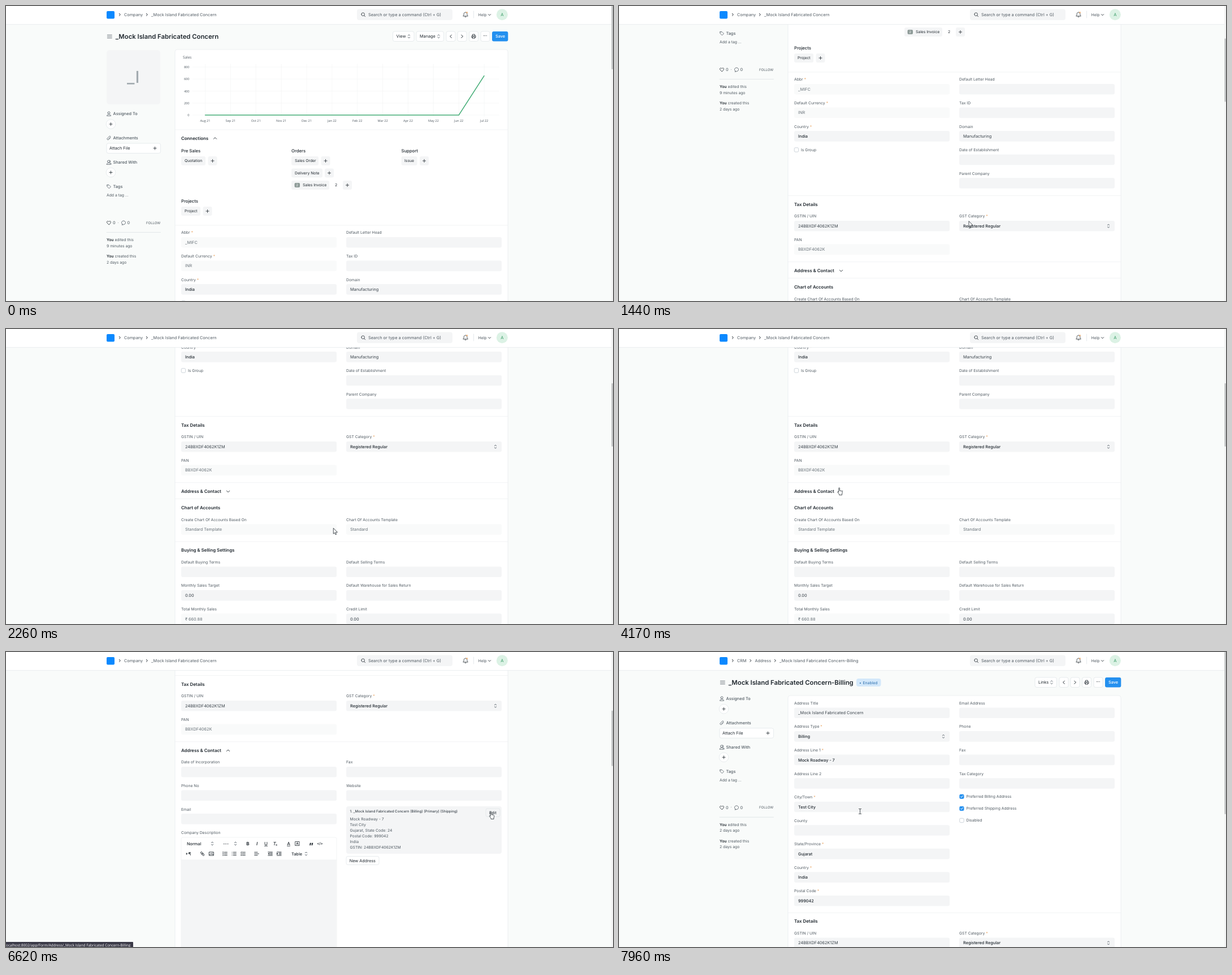
Animation of 1074 by 522 pixels, one loop 8000 ms. Source, as an HTML page:

```html
<!DOCTYPE html>
<html lang="en">
<head>
<meta charset="utf-8">
<title>Company form</title>
<style>
html, body { margin: 0; width: 100%; height: 100%; overflow: hidden; background: #f9fbfa; }
svg { display: block; width: 1074px; height: 522px; font-family: Inter, sans-serif; text-rendering: geometricPrecision; }
text { white-space: pre; }
.plain { font-family: "Open Sans", "Noto Sans", sans-serif; }
</style>
</head>
<body>
<svg id="stage" viewBox="0 0 1074 522"></svg>
<script>
const INK = '#1f272e', MID = '#505a62', MUTED = '#687178', FIELD = '#f4f5f6', LINE = '#eceff1', BLUE = '#2490ef';
const NAME = '_Mock Island Fabricated Concern', TAX_ID = '24BBXDF4062K1ZM', PAN = 'BBXDF4062K';
const LEFT = 310, RIGHT = 602, LOOP = 8000;

// Drawing helpers; text is placed by its vertical centre.
const text = (x, y, s, size = 6.8, fill = MID, weight = 400, extra = '') =>
  `<text x="${x}" y="${y + size * 0.36}" font-size="${size}" fill="${fill}" font-weight="${weight}" ${extra}>${s}</text>`;
const rect = (x, y, w, h, fill = FIELD, r = 3, extra = '') =>
  `<rect x="${x}" y="${y}" width="${w}" height="${h}" rx="${r}" fill="${fill}" ${extra}/>`;
const path = (d, stroke = MID, width = 0.8, fill = 'none') =>
  `<path d="${d}" stroke="${stroke}" stroke-width="${width}" fill="${fill}" stroke-linecap="round" stroke-linejoin="round"/>`;
const icon = (x, y, d, stroke, width, fill) => `<g transform="translate(${x} ${y})">${path(d, stroke, width, fill)}</g>`;
const group = (id, body) => `<g id="${id}">${body}</g>`;
const rule = (y, x = 299, end = 888) => path(`M${x} ${y}H${end}`, LINE, 0.7);
const raised = (x, y, w, h, fill = '#fff', extra = '') => rect(x, y, w, h, fill, 3, `stroke="#dfe4e7" stroke-width=".7" ${extra}`);

const right = (x, y, s = 1) => icon(x, y, `M${-s} ${-2 * s}L${s} 0L${-s} ${2 * s}`, INK, 1);
const left = (x, y, s = 1) => icon(x, y, `M${s} ${-2 * s}L${-s} 0L${s} ${2 * s}`, INK, 1);
const down = (x, y, s = 1) => icon(x, y, `M${-2.6 * s} ${-1.3 * s}L0 ${1.3 * s}L${2.6 * s} ${-1.3 * s}`, INK, 0.9);
const up = (x, y) => icon(x, y, 'M-2.6 1.3L0 -1.3L2.6 1.3', INK, 0.9);
const upDown = (x, y) => icon(x, y, 'M-1.7 -1.4L0 -3L1.7 -1.4M-1.7 1.4L0 3L1.7 1.4', MID, 0.9);
const plus = (x, y) => icon(x, y, 'M-2.6 0H2.6M0 -2.6V2.6', INK, 0.8);

const head = (y, s, x = LEFT) => text(x, y, s, 7.85, INK, 600);
const label = (x, y, s, req) => text(x, y, s + (req ? ' <tspan fill="#e9a25f">*</tspan>' : ''));

// kind: '' editable, 'r' read-only, 'b' emphasised, 's' select; a star marks required.
function field(x, y, name, value = '', kind = '') {
  const ro = kind.includes('r'), strong = /[bs]/.test(kind);
  return label(x, y, name, kind.includes('*')) + rect(x, y + 8, 275, 18.6, ro ? '#f9fafa' : FIELD) +
    text(x + 7, y + 17.3, value, 7.3, ro ? MUTED : strong ? INK : '#39424a', strong ? 500 : 400) +
    (kind.includes('s') ? upDown(x + 264, y + 17.3) : '');
}
const fields = (x, y, list) => list.map((f, i) => field(x, y + i * 41.55, ...f)).join('');

function check(y, name, on, x = RIGHT) {
  return rect(x + 0.7, y - 3.7, 7.4, 7.4, on ? BLUE : '#fff', 1.8, `stroke="${on ? BLUE : '#b8c2ca'}" stroke-width=".7"`) +
    (on ? icon(x + 4.4, y, 'M-1.9 0L-.5 1.5L2 -1.5', '#fff', 1) : '') + text(x + 12.5, y, name);
}

function badge(x, y, w, name, pad = 6) {
  return rect(x, y - 8, w, 16) + text(x + pad, y, name, 6.8, INK);
}
const adder = (x, y) => rect(x, y - 8, 16, 16) + plus(x + 8, y);

function sidebar(y, edited) {
  const round = cy => `<circle cx="185.5" cy="${cy}" r="8.3" fill="#fff" stroke="#dfe4e7" stroke-width=".7"/>` + plus(185.5, cy);
  const title = (cy, s) => text(189.5, cy, s, 7.3, MID, 500);
  const person = 'M-2 -1.5A2 2 0 1 1 2 -1.5A2 2 0 1 1 -2 -1.5M-3.5 3.5C-3 .3 3 .3 3.5 3.5Z';
  const you = (cy, s) => text(178, cy, `<tspan font-weight="600" fill="${INK}">You</tspan> ${s} this`);
  return `<g transform="translate(0 ${y})">` +
    icon(182, 190.5, person) + title(190.5, 'Assigned To') + round(209) +
    icon(182, 233.5, 'M2.8 -.5L-.3 2.8C-2 4.4 -4.2 2 -2.6 .4L.8 -3C2 -4 3.5 -2.5 2.4 -1.4L-.7 1.7') + title(233.5, 'Attachments') +
    raised(178, 243, 95.5, 17.5) + text(183, 251.7, 'Attach File', 7.3, INK) + plus(263.5, 251.7) +
    icon(181.5, 276.5, person) + icon(183.5, 276.5, 'M0 -3.5A2 2 0 0 1 0 .2M1 1Q2.8 1.5 2.8 3.5') + title(276.5, 'Shared With') + round(294.5) +
    icon(182, 319.5, 'M-3 -3H0L3.4 .4L.4 3.4L-3 0ZM-1.6 -1.5V-1.4') + title(319.5, 'Tags') + text(178, 334.8, 'Add a tag ...') +
    icon(182, 383.7, 'M0 3.2L-3 .2C-4.8 -2 -1.8 -4.5 0 -2C1.8 -4.5 4.8 -2 3 .2Z', INK) + text(189, 383.5, '0', 7.3) +
    text(197.5, 383, '·', 7.3) + icon(208, 383.5, 'M-2 2.7A3.5 3.3 0 1 1 .5 3.2L-2.7 3.7Z') + text(214.5, 383.5, '0', 7.3) +
    text(248, 383.5, 'FOLLOW', 6, MID) + path('M178 400.5H273.5', '#dde2e5', 0.8) +
    you(414, 'edited') + text(178, 424.2, edited) + you(443, 'created') + text(178, 453.2, '2 days ago') + '</g>';
}

function pageHead(title, menus) {
  const menu = ([x, w, s]) => raised(x, 45, w, 17.5) + text(x + 6, 53.7, s, 7.3, INK) + upDown(x + w - 9, 53.7);
  return icon(183.3, 54, 'M-4 -2.7H4M-4 0H4M-4 2.7H4', MID, 0.8) + text(193.7, 54, title, 11.3, INK, 600) +
    menus.map(menu).join('') + [779, 799, 819.5, 840].map(x => raised(x, 45, 16, 17.5)).join('') +
    left(787, 53.7, 1.3) + right(807, 53.7, 1.3) +
    icon(827.5, 53.7, 'M-2 -1V-3.5H2V-1M-2 2H-3.5V-1H3.5V2H2M-2 .8H2V3.5H-2Z', INK) +
    text(847.8, 52.3, '···', 7, INK, 700, 'text-anchor="middle"') +
    rect(860, 45, 28.3, 17.5, BLUE) + text(866, 53.7, 'Save', 7.3, '#fff', 500);
}
const card = h => rect(299, 77, 589, h, '#fff', 4, 'stroke="#e9edef" stroke-width=".8"');

function chart() {
  const months = ['Aug 21', 'Sep 21', 'Oct 21', 'Nov 21', 'Dec 21', 'Jan 22', 'Feb 22', 'Mar 22', 'Apr 22', 'May 22', 'Jun 22', 'Jul 22'];
  let out = text(313, 90.5, 'Sales', 6.4, MID, 400, 'class="plain"');
  for (let i = 0; i < 5; i++) {
    const y = 193 - i * 21.25;
    out += path(`M330 ${y}H872`, '#f1f3f4', 0.6) + text(324.5, y, i * 200, 5.6, MID, 400, 'class="plain" text-anchor="end"');
  }
  months.forEach((m, i) => {
    const x = 352.5 + i * 44.87;
    out += path(`M${x} 103V196`, '#f1f3f4', 0.6) + text(x, 202.5, m, 5.6, MID, 400, 'class="plain" text-anchor="middle"');
  });
  return out + path('M352.5 193H801.2L846 123.5', '#46ae78', 1.4);
}

function connections() {
  const sub = (x, y, s) => text(x, y, s, 7.7, INK, 500);
  return head(234, 'Connections') + up(370, 234) +
    sub(310, 256, 'Pre Sales') + badge(310, 274, 43, 'Quotation') + adder(357.5, 274) +
    sub(505, 256, 'Orders') + badge(505, 274, 48, 'Sales Order') + adder(557.5, 274) +
    badge(505, 295.5, 55, 'Delivery Note') + adder(564, 295.5) +
    badge(505, 317, 67, 'Sales Invoice', 20) + rect(510.5, 313, 9.5, 8, '#8e9b98', 2) +
    text(515.2, 317, '2', 6, '#fff', 400, 'text-anchor="middle"') + text(582, 317, '2', 6.8, INK) + adder(596, 317) +
    sub(699.5, 256, 'Support') + badge(699.5, 274, 28, 'Issue', 5.5) + adder(732, 274) +
    sub(310, 345, 'Projects') + badge(310, 363, 34, 'Project') + adder(348.5, 363);
}

const taxDetails = y => head(y, 'Tax Details') +
  fields(LEFT, y + 21, [['GSTIN / UIN', TAX_ID], ['PAN', PAN, 'r']]) + field(RIGHT, y + 21, 'GST Category', 'Registered Regular', 's*');

function settings() {
  return down(393, 739.5) + rule(752.5) + head(768, 'Chart of Accounts') +
    field(LEFT, 789.3, 'Create Chart Of Accounts Based On', 'Standard Template', 'r') +
    field(RIGHT, 789.3, 'Chart Of Accounts Template', 'Standard', 'r') +
    rule(828.3) + head(843, 'Buying &amp; Selling Settings') +
    fields(LEFT, 864.5, [['Default Buying Terms'], ['Monthly Sales Target', '0.00'], ['Total Monthly Sales', '₹ 660.88', 'r']]) +
    fields(RIGHT, 864.5, [['Default Selling Terms'], ['Default Warehouse for Sales Return'], ['Credit Limit', '0.00']]);
}

function editor() {
  const a = 904, b = 922;
  const glyph = (x, y, s, extra = '', weight = 500) => text(x, y, s, 8, INK, weight, 'text-anchor="middle" ' + extra);
  const rows = 'M-1.5 -2.7H3.8M-1.5 0H3.8M-1.5 2.7H3.8';
  const dent = 'M-3.8 -3H3.8M0 -1H3.8M0 1H3.8M-3.8 3H3.8';
  return rect(LEFT, 893, 275, 300, '#fff', 3, `stroke="${LINE}" stroke-width=".7"`) + rect(LEFT, 933, 275, 300, FIELD, 0) +
    rule(933, LEFT, 585) + text(320, a, 'Normal', 7.3, INK, 500) + upDown(365, a) + text(384, a, '---', 7.3, INK, 500) + upDown(406, a) +
    glyph(428, a, 'B', '', 700) + glyph(444, a, 'I', 'font-style="italic"', 600) + glyph(460, a, 'U', 'text-decoration="underline"') +
    glyph(475, a, 'T', 'font-style="italic"') + text(477, a + 2, 'x', 5.5, INK, 500) + glyph(500, a, 'A', 'text-decoration="underline"') +
    icon(515.5, a, 'M-3.5 -3.5H3.5V3.5H-3.5Z', INK, 0.8) + text(515.5, a, 'A', 6, INK, 600, 'text-anchor="middle"') +
    text(540, a + 3.5, '”', 14, INK, 800, 'text-anchor="middle"') + text(555.5, a, '&lt;/&gt;', 6, INK, 600, 'text-anchor="middle"') +
    icon(320, b, 'M-.6 -1.2L1 0L-.6 1.2Z', INK, 0.6, INK) + glyph(325, b, '¶') +
    icon(347.5, b, 'M-.5 .8C-2 -.2 -3.8 -1.2 -3 -2.7S-.5 -3 .8 -1.5M.5 -.8C2 .2 3.8 1.2 3 2.7S.5 3 -.8 1.5M-1 -1L1 1', INK, 1) +
    icon(363.5, b, 'M-3.8 -3H3.8V3H-3.8ZM-3 2L-1 -.5L.5 1L1.5 0L3 2M1.5 -1.5V-1.4', INK, 0.9) +
    [387.5, 403.5, 419.5].map((x, i) => icon(x, b, rows + ['M-3.5 -3.5V-2M-3.5 -.7V.7M-3.5 2V3.5', 'M-3.6 -2.7H-3.5M-3.6 0H-3.5M-3.6 2.7H-3.5',
      'M-4 -2.7L-3.4 -2L-2.6 -3.3M-4 0L-3.4 .7L-2.6 -.6M-4 2.7L-3.4 3.4L-2.6 2.1'][i], INK, 0.9)).join('') +
    icon(443.5, b, 'M-3.8 -2.7H1.5M-3.8 0H3.8M-3.8 2.7H1.5', INK, 0.9) +
    icon(467.5, b, dent + 'M-2 -1.2L-3.6 0L-2 1.2Z', INK, 0.9) + icon(483.2, b, dent + 'M-3.6 -1.2L-2 0L-3.6 1.2Z', INK, 0.9) +
    text(505, b, 'Table', 7.3, INK, 500) + upDown(531, b);
}

function contact() {
  const lines = ['Mock Roadway - 7', 'Test City', 'Gujarat, State Code: 24', 'Postal Code: 999042', 'India', 'GSTIN: ' + TAX_ID];
  return up(393, 739.3) + fields(LEFT, 760, [['Date of Incorporation'], ['Phone No'], ['Email']]) +
    fields(RIGHT, 760, [['Fax'], ['Website']]) + label(LEFT, 884.5, 'Company Description') + editor() +
    rect(RIGHT, 838, 275, 84, FIELD, 4) + text(608.5, 847.2, `1. ${NAME} (Billing) (Primary) (Shipping)`, 6.2, '#39424a', 500) +
    lines.map((s, i) => text(608.5, 860.2 + i * 10.15, s)).join('') +
    raised(849, 842, 25, 14.5, '#fff', 'id="edit"') + text(855, 849.3, 'Edit', 7.2, INK) +
    raised(602, 926.5, 58, 15) + text(607.7, 934, 'New Address', 7.3, INK);
}

const company = () => pageHead(NAME, [[684.5, 37.5, 'View'], [726, 48.5, 'Manage']]) +
  rect(178, 78, 95, 96, FIELD, 5) + text(214, 125.5, '_I', 29, '#a3abb0', 500) + sidebar(0, '9 minutes ago') +
  card(1200) + chart() + rule(219) + connections() + rule(388) +
  fields(LEFT, 401, [['Abbr', '_MIFC', 'r*'], ['Default Currency', 'INR', 'r*'], ['Country', 'India', 'b*']]) +
  fields(RIGHT, 401, [['Default Letter Head'], ['Tax ID'], ['Domain', 'Manufacturing'], ['Date of Establishment'], ['Parent Company']]) +
  check(525.5, 'Is Group', false, 309.5) + rule(606.5) + taxDetails(622) + rule(723.7) +
  head(739, 'Address &amp; Contact') + group('closed', settings()) + group('open', contact());

const address = () => pageHead(NAME + '-Billing', [[736, 38.5, 'Links']]) +
  rect(420, 47, 43.5, 14, '#d3e8fa', 4) + text(425, 54.2, '•', 6.8, '#2c6fae') + text(431.5, 54.2, 'Enabled', 6.8, '#2c6fae') +
  sidebar(-108.2, '2 days ago') + card(600) +
  fields(LEFT, 90.5, [['Address Title', NAME], ['Address Type', 'Billing', 's*'], ['Address Line 1', 'Mock Roadway - 7', 'b*'], ['Address Line 2'],
    ['City/Town', 'Test City', 'b*'], ['County'], ['State/Province', 'Gujarat', 'b*'], ['Country', 'India', 'b*'], ['Postal Code', '999042', 'b*']]) +
  fields(RIGHT, 90.5, [['Email Address'], ['Phone'], ['Fax'], ['Tax Category']]) +
  check(255.8, 'Preferred Billing Address', true) + check(277, 'Preferred Shipping Address', true) + check(298, 'Disabled', false) +
  rule(461.5) + taxDetails(476.5);

const crumb = (x, s) => right(x - 7.7, 15.3) + text(x, 15.3, s, 7.3, MID);
const navbar = () => rect(0, 0, 1074, 32.5, '#fff', 0) + path('M0 32.7H1074', '#e4e8ea', 0.8) +
  rect(178, 9, 14, 13.5, '#0b89ff', 2) +
  group('crumbs1', crumb(209, 'Company') + crumb(257, NAME)) +
  group('crumbs2', crumb(209, 'CRM') + crumb(240.5, 'Address') + crumb(284, NAME + '-Billing')) +
  rect(621, 5.5, 169, 19.5, FIELD, 4) + icon(632, 15.2, 'M-3.2 -.5A2.8 2.8 0 1 1 2.4 -.5A2.8 2.8 0 1 1 -3.2 -.5M1.6 1.5L3.6 3.6', INK) +
  text(641, 15.3, 'Search or type a command (Ctrl + G)', 7.4, MID) +
  icon(813, 15, 'M-4 2.6C-2.5 1 -3 -.5 -2.7 -1.8C-2 -4.6 2 -4.6 2.7 -1.8C3 -.5 2.5 1 4 2.6ZM-1 4.3H1', INK) +
  '<circle cx="815.5" cy="11.5" r="1.3" fill="#e9a25f"/>' + path('M827.5 9V21', '#dfe4e7', 0.8) +
  text(835.5, 15.3, 'Help', 6.9, MID) + down(855.5, 15.7, 0.8) +
  '<circle cx="877.8" cy="15.2" r="10" fill="#dcf2e5"/>' + text(877.8, 15.3, 'A', 7.6, '#369a64', 400, 'text-anchor="middle"');

const pointers = {
  arrow: 'M0 0V9.6L2.2 7.6L3.8 11.2L5.4 10.5L3.8 7H6.8Z',
  hand: 'M-1.3 7.3V.8C-1.3 -.4 .5 -.4 .5 .8V5L3.8 5.6Q5.4 6 5.2 7.8L4.5 11V12.8H-.4V11.4L-3 8C-3.6 6.8 -2.4 6 -1.3 7.3Z',
  beam: 'M-2 -4.5H-.6L0 -4L.6 -4.5H2M0 -4V4M-2 4.5H-.6L0 4L.6 4.5H2'
};
const stage = document.getElementById('stage');
stage.innerHTML = group('company', company()) + group('address', address()) + navbar() +
  rect(1071, 0, 3, 522, '#f3f4f4', 0) + rect(1071.3, 0, 2.7, 112, '#c3c5c6', 1, 'id="thumb"') +
  group('status', rect(-4, 513, 229, 12, '#3b3a48', 1) +
    text(-1.5, 518.8, `localhost:8002/app/Form/Address/${NAME}-Billing`, 6.4, '#fff', 400, 'class="plain"')) +
  group('cursor', Object.entries(pointers).map(([k, d]) => group(k, path(d, INK, 0.8, k == 'beam' ? 'none' : '#fff'))).join(''));

const $ = id => document.getElementById(id);
const show = (id, on) => $(id).style.display = on ? '' : 'none';

const SCROLL = [[0, 0], [900, 0], [1040, 60], [1100, 60], [1400, 271], [1910, 271], [2200, 452], [5050, 452], [5300, 565]];
const CURSOR = [
  [280, 700, 530, 'arrow'], [900, 619, 381], [1910, 619, 381], [2260, 579.5, 353], [2660, 480, 258], [2730, 470, 250, 'beam'],
  [2900, 330, 206], [3100, 325, 250], [3300, 400, 207], [3480, 573, 206], [3620, 575, 183, 'arrow'], [3880, 366, 232],
  [4100, 390, 281, 'hand'], [5050, 390, 281], [5230, 410, 288, 'beam'], [5310, 412, 288.5], [5370, 412, 288.5], [5590, 610, 292, 'arrow'],
  [5800, 809, 290], [6100, 834, 297], [6370, 858.5, 282.8, 'hand'], [6950, 858.5, 282.8, 'arrow'], [7100, 858, 282],
  [7750, 591, 271], [7820, 560, 273, 'beam'], [7960, 426.5, 282]
];

function at(keys, t, ease = k => k) {
  const i = keys.findLastIndex(k => k[0] <= t), a = keys[i], b = keys[i + 1] || a;
  const k = a === b ? 0 : ease((t - a[0]) / (b[0] - a[0]));
  return a.slice(1, 3).map((v, j) => v + (b[j + 1] - v) * k);
}

function draw(t) {
  const second = t >= 6950, open = t >= 4500;
  const [scroll] = at(SCROLL, t, k => k * k * (3 - 2 * k));
  for (const id of ['company', 'crumbs1']) show(id, !second);
  for (const id of ['address', 'crumbs2']) show(id, second);
  show('open', open);
  show('closed', !open);
  show('status', t >= 6620 && !second);
  $('company').setAttribute('transform', `translate(0 ${-scroll})`);
  $('edit').setAttribute('fill', t >= 6620 ? FIELD : '#fff');
  $('thumb').setAttribute('y', second ? 0 : scroll * (open ? 0.1836 : 0.2124));
  $('thumb').setAttribute('height', second ? 287 : open ? 98 : 112);
  show('cursor', t >= 280);
  if (t < 280) return;
  const kind = CURSOR.filter(k => k[0] <= t && k[3]).pop()[3];
  for (const k in pointers) show(k, k === kind);
  $('cursor').setAttribute('transform', `translate(${at(CURSOR, t)})`);
}

const start = performance.now();
function tick() {
  draw((performance.now() - start) % LOOP);
  requestAnimationFrame(tick);
}
tick();
</script>
</body>
</html>
```
